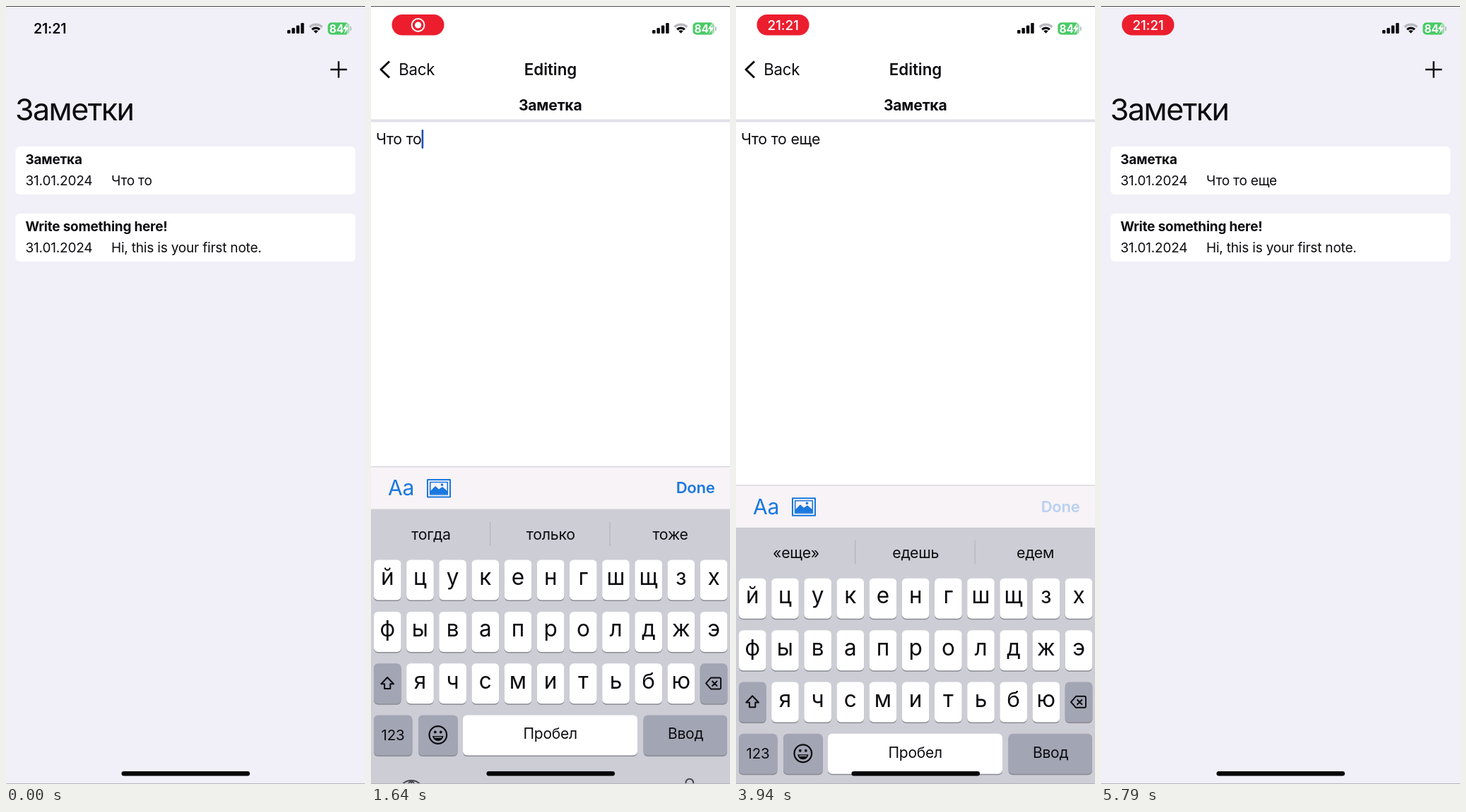
An HTML page with a canvas that plays this animation: 508x1102 px, repeating every 5.82 s.

```html
<!DOCTYPE html>
<html lang="ru">
<head>
<meta charset="utf-8">
<title>Заметки</title>
<style>
html, body { margin: 0; width: 100%; height: 100%; overflow: hidden; background: #f1f0f8; }
canvas { display: block; width: 508px; height: 1102px; }
</style>
</head>
<body>
<canvas id="stage" width="508" height="1102"></canvas>
<script>
const ctx = document.getElementById('stage').getContext('2d');
const W = 508, H = 1102, LOOP = 5820;
const INK = '#0c0c10', BLUE = '#1a78de', KEY_GRAY = '#a2a5b3';

const PUSH = 475, POP = 4245, KEYBOARD_IN = 1418, KEYBOARD_OUT = 3893, CARET_IN = 1400, DONE_TAP = 3840;
const KEY_ROWS = ['йцукенгшщзх', 'фывапролджэ', 'ячсмитьбю'];

// Each entry takes effect at `at`; its key is held down around that time.
const TYPING = [
  { at: 0, text: 'Что то', hints: ['тогда', 'только', 'тоже'] },
  { at: 2200, text: 'Что то ', hints: ['у', 'я', 'мне'], key: ' ' },
  { at: 2620, text: 'Что то е', hints: ['«е»', 'если', 'его'], key: 'е' },
  { at: 2960, text: 'Что то ещ', hints: ['«ещ»', 'еще', 'ещё'], key: 'щ' },
  { at: 3300, text: 'Что то еще', hints: ['«еще»', 'едешь', 'едем'], key: 'е' }
];

const clamp = v => Math.max(0, Math.min(1, v));
const ramp = (t, start, length) => clamp((t - start) / length);

// Critically damped settle: 1 before the start, falling to 0.
function settle(t, start, rate) {
  const x = Math.max(0, t - start) / 1000 * rate;
  return (1 + x) * Math.exp(-x);
}

function text(str, x, y, size, weight = 400, color = INK, align = 'left', tracking = -0.01) {
  ctx.font = `${weight} ${size}px Inter, "Noto Sans", sans-serif`;
  ctx.letterSpacing = `${tracking * size}px`;
  ctx.textAlign = align;
  ctx.fillStyle = color;
  ctx.fillText(str, x, y);
}

function box(x, y, w, h, r, color) {
  ctx.fillStyle = color;
  ctx.beginPath();
  ctx.roundRect(x, y, w, h, r);
  ctx.fill();
}

function disc(x, y, r, color) {
  ctx.fillStyle = color;
  ctx.beginPath();
  ctx.arc(x, y, r, 0, Math.PI * 2);
  ctx.fill();
}

function stroke(d, width, color = INK) {
  ctx.strokeStyle = color;
  ctx.lineWidth = width;
  ctx.lineJoin = 'round';
  ctx.stroke(new Path2D(d));
}

function fillPath(d, color) {
  ctx.fillStyle = color;
  ctx.fill(new Path2D(d));
}

function layer(alpha, draw, dx = 0, dy = 0) {
  if (alpha <= 0) return;
  ctx.save();
  ctx.globalAlpha *= alpha;
  ctx.translate(dx, dy);
  draw();
  ctx.restore();
}

function card(y, title, body) {
  box(13.5, y, 481, 68, 6, '#fff');
  text(title, 27.5, y + 25, 18.9, 700);
  text('31.01.2024', 27.5, y + 55, 19);
  text(body, 149, y + 55, 19);
}

function drawList(t) {
  text('Заметки', 13, 162, 43, 400, INK, 'left', -0.036);
  card(199, 'Заметка', t < PUSH + 700 ? 'Что то' : 'Что то еще');
  card(294, 'Write something here!', 'Hi, this is your first note.');
}

function drawEditor(t, typed) {
  box(0, 0, W, H, 0, '#fff');
  text('Заметка', 253.7, 148, 21.1, 700, INK, 'center');
  box(0, 160.5, W, 4, 0, '#e1e0e8');
  text(typed, 7, 196, 21.3);
  if (t > CARET_IN && t < DONE_TAP + 40) {
    const x = 7 + ctx.measureText(typed).width;
    box(x, 175, 2.6, 27, 1.3, t < 1750 ? '#2350b4' : '#245fe0');
  }
}

function drawNavigation(shown) {
  const cover = 1 - shown;
  layer(cover, () => {
    stroke('M26 78.5 L14 90 L26 101.5', 3);
    text('Back', 39.3 + 39.5 * shown, 98, 22.2);
  });
  layer(cover ** 2, () => text('Editing', 254 + 280 * shown, 98, 22.3, 600, INK, 'center', 0));
  layer(shown, () => stroke('M459 90 H482.5 M470.7 78.3 V101.7', 2.4));
}

function key(x, y, w, color) {
  box(x, y + 1.5, w, 57, 6, '#898b93');
  box(x, y, w, 57, 6, color);
}

// A fading row of hints is wiped from right to left.
function drawHints(hints, fade = 0) {
  hints.forEach((word, i) => {
    const x = 85 + 169.3 * i;
    let color = INK;
    if (fade > 0) {
      const edge = 1 - fade, solid = `rgba(12,12,16,${clamp(2 * edge)})`;
      color = ctx.createLinearGradient(x - 32, 0, x + 32, 0);
      color.addColorStop(0, solid);
      color.addColorStop(edge, solid);
      color.addColorStop(Math.min(1, edge + 0.15), `rgba(12,12,16,${0.8 * edge})`);
    }
    text(word, x, 689.5, 21.3, 400, color, 'center');
  });
}

function drawToolbar(t) {
  box(0, 586, W, 60, 0, '#f7f3f7');
  box(0, 585.5, W, 1.2, 0, '#d6d3da');
  text('Aa', 24, 627, 30, 400, BLUE);
  stroke('M80 604.5 H112 V629 H80 Z', 2, BLUE);
  stroke('M83.7 608 H108.3 V625.5 H83.7 Z', 1.6, BLUE);
  fillPath('M84 625 V620.5 L91 613.5 L96 618 L101 614.5 L108 620.5 V625 Z', BLUE);
  disc(100.5, 611.6, 1.8, BLUE);
  const pressed = ramp(t, DONE_TAP, 60) * (1 - ramp(t, 4000, 200));
  layer(1 - 0.72 * pressed, () => text('Done', 486.5, 624, 22, 600, BLUE, 'right'));
}

function drawKeyIcons() {
  stroke('M23.2 884.5 L32 893.8 H27.3 V900.5 H19.1 V893.8 H14.4 Z', 2);
  stroke('M481 885 H493 Q495 885 495 887 V899 Q495 901 493 901 H481 L474 893 Z M482.5 889.5 L490 897 M490 889.5 L482.5 897', 1.9);
  stroke('M82.5 966 a12.3 12.3 0 1 0 24.6 0 a12.3 12.3 0 1 0 -24.6 0', 2.2);
  disc(90.8, 962, 1.9, INK);
  disc(98.8, 962, 1.9, INK);
  fillPath('M87 967.5 H102.6 Q101 974.5 94.8 974.5 Q88.5 974.5 87 967.5 Z', INK);
  stroke('M89.5 969.4 H100', 1.4, KEY_GRAY);
  const dark = '#484950';
  stroke('M39.5 1048 a17.5 17.5 0 1 0 35 0 a17.5 17.5 0 1 0 -35 0 M39.5 1048 H74.5 M57 1030.5 V1065.5'
    + ' M57 1030.5 C46 1040 46 1056 57 1065.5 C68 1056 68 1040 57 1030.5'
    + ' M44 1036.5 Q57 1043 70 1036.5 M44 1059.5 Q57 1053 70 1059.5', 1.8, dark);
  stroke('M445.5 1033.5 a5.3 5.3 0 0 1 10.6 0 V1048 a5.3 5.3 0 0 1 -10.6 0 Z'
    + ' M438.8 1043.5 V1047 a12 12 0 0 0 24 0 V1043.5 M450.8 1059 V1065 M444 1065 H457.5', 2, dark);
}

function drawCallout(letter, x, y) {
  box(x - 32, y - 72, 64, 68, 12, '#fff');
  fillPath(`M${x - 30} ${y - 10} L${x - 19.3} ${y + 8} H${x + 19.3} L${x + 30} ${y - 10} Z`, '#fff');
  box(x - 19.3, y - 5, 38.6, 62, 6, '#fff');
  text(letter, x, y - 26, 43, 400, INK, 'center', 0);
}

function drawKeyboard(t, stage) {
  drawToolbar(t);
  box(0, 646, W, H, 0, '#cdcdd6');
  box(168, 664, 1.2, 34, 0, '#b2b3bb');
  box(337.5, 664, 1.2, 34, 0, '#b2b3bb');

  const current = TYPING[stage], fade = ramp(t, current.at, 180);
  if (stage > 0 && fade < 1) drawHints(TYPING[stage - 1].hints, fade);
  layer(stage > 0 ? clamp(fade * 2) : 1, () => drawHints(current.hints));

  const held = TYPING.find(s => s.key && t >= s.at - 60 && t < s.at + 50)?.key;
  let callout;
  KEY_ROWS.forEach((row, r) => [...row].forEach((letter, i) => {
    const x = 23.3 + 46.17 * (i + (r === 2 ? 1 : 0)), y = 718 + 73.4 * r;
    key(x - 19.3, y, 38.6, '#fff');
    text(letter, x, y + 35.5, 31.5, 400, INK, 'center', 0);
    if (letter === held) callout = [letter, x, y];
  }));

  key(4, 864.8, 38.6, KEY_GRAY);
  key(465.7, 864.8, 38.6, KEY_GRAY);
  key(4, 938, 54.5, KEY_GRAY);
  key(67, 938, 55.7, KEY_GRAY);
  key(130, 938, 247, held === ' ' ? KEY_GRAY : '#fff');
  key(385.5, 938, 118.5, KEY_GRAY);
  text('123', 31, 973.5, 20.5, 400, INK, 'center');
  text('Пробел', 253.7, 972, 21, 400, INK, 'center');
  text('Ввод', 445, 972, 21, 400, INK, 'center');
  drawKeyIcons();
  if (callout) drawCallout(...callout);
}

function wifiBand(inner, outer, color) {
  const a = -Math.PI * 0.75, b = -Math.PI * 0.25;
  ctx.fillStyle = color;
  ctx.beginPath();
  ctx.arc(438.5, 38.8, outer, a, b);
  ctx.arc(438.5, 38.8, inner, b, a, true);
  ctx.fill();
}

function drawStatus(t) {
  [5, 8, 11.5, 15].forEach((h, i) => box(398 + 6.4 * i, 39 - h, 4.5, h, 1.2, INK));
  wifiBand(0, 4.5, INK);
  wifiBand(6, 9.2, INK);
  wifiBand(10.8, 14.2, '#b9b9c0');

  box(455.5, 23.5, 30.5, 17, 5, '#a5dcb2');
  box(455.5, 23.5, 26.5, 17, [5, 1, 1, 5], '#48cb65');
  box(487, 29, 1.6, 6, 1, '#aab5b0');
  text('84', 457.5, 37.7, 15.5, 700, '#fff');
  fillPath('M482.5 24.5 L476.5 33 H480.2 L478.5 39.5 L485 30.5 H481 Z', '#fff');

  const pill = ramp(t, 150, 250);
  layer(1 - pill, () => text('21:21', 39, 38.7, 19.6, 600));
  layer(pill, () => {
    const dim = ((1 + Math.cos((t - 760) / 1925 * Math.PI * 2)) / 2) ** 3;
    box(29.5, 12, 74, 29.5, 14.7, `rgb(${236 - 32 * dim},${30 - 2 * dim},${46 - 5 * dim})`);
    const toTime = ramp(t, 3100, 250);
    layer(1 - toTime, () => {
      stroke('M57.7 27 a8.9 8.9 0 1 0 17.8 0 a8.9 8.9 0 1 0 -17.8 0', 2, '#fff');
      disc(66.6, 27, 4.6, '#fff');
    });
    layer(toTime, () => text('21:21', 66.6, 33.8, 19, 500, '#fff', 'center'));
  });
}

function draw(t) {
  const cover = t < POP ? 1 - settle(t, PUSH, 14) : settle(t, POP, 14);
  const shown = 1 - cover;
  const drop = 516 * (t < KEYBOARD_OUT ? settle(t, KEYBOARD_IN, 16) : 1 - settle(t, KEYBOARD_OUT, 16));
  const stage = TYPING.findLastIndex(s => t >= s.at);

  box(0, 0, W, H, 0, '#f1f0f8');
  layer(1, () => drawList(t), -152 * cover);
  box(0, 0, W, H, 0, `rgba(0,0,0,${0.1 * cover})`);
  layer(1, () => drawEditor(t, TYPING[stage].text), W * shown);
  drawNavigation(shown);
  if (drop < 514) layer(1, () => drawKeyboard(t, stage), 0, drop);
  drawStatus(t);
  box(163.5, 1084, 181.5, 6.6, 3.3, '#050507');
  box(0, 0, W, 1, 0, '#4a4a50');
  box(0, H - 1, W, 1, 0, '#b4b4ba');
}

const begin = performance.now();
function frame() {
  draw((performance.now() - begin) % LOOP);
  requestAnimationFrame(frame);
}
frame();
</script>
</body>
</html>
```
